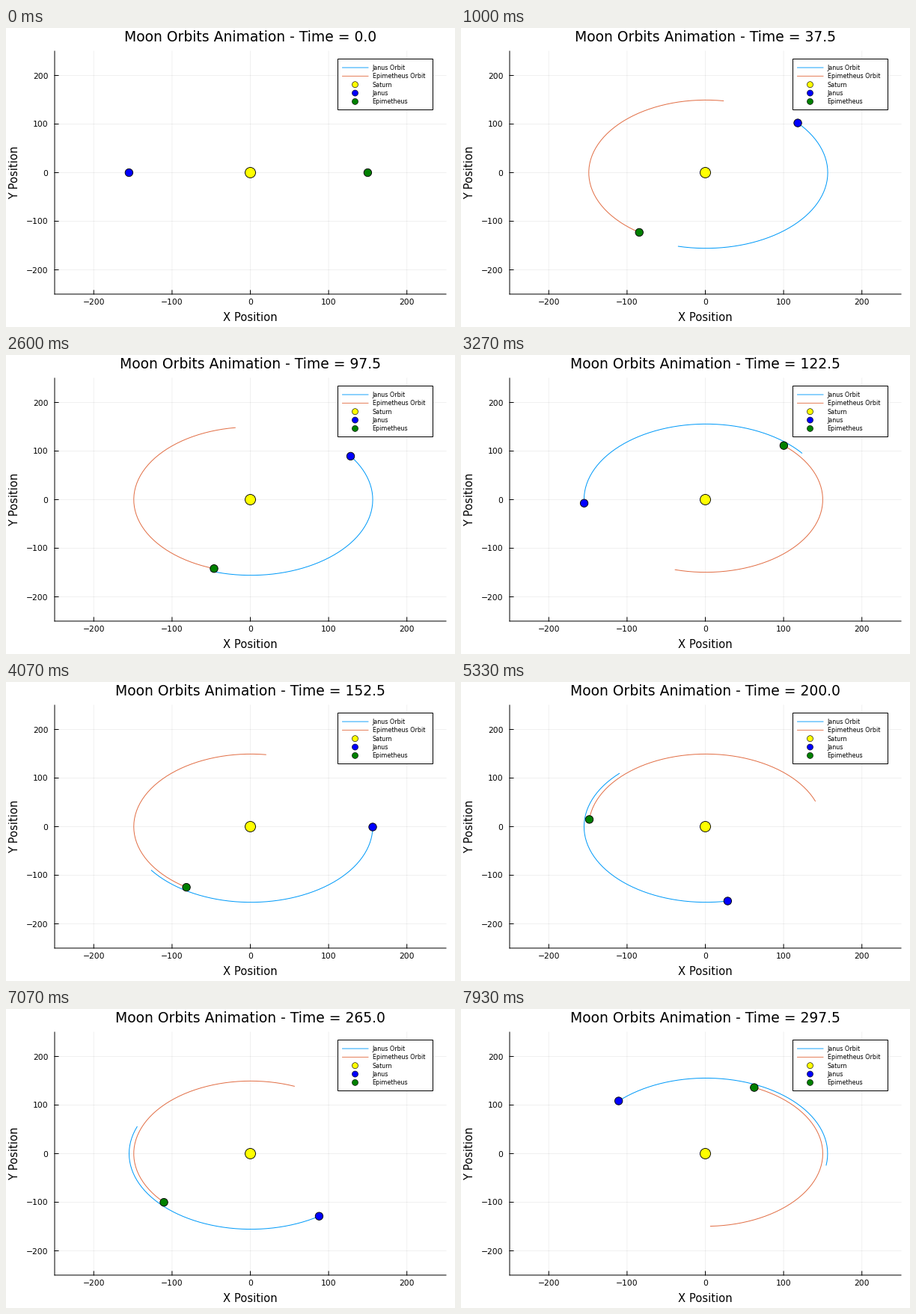
A matplotlib script that plays this animation: 600 by 400 pixels, repeating every 8000 ms.

```python
import numpy as np
import matplotlib.pyplot as plt
from matplotlib.animation import FuncAnimation
from matplotlib.patches import Circle, Rectangle

plt.rcParams["font.family"] = "DejaVu Sans"
plt.rcParams["path.snap"] = False

W, H, DPI = 600, 400, 100
POSES, HOLD, LOOP_MS = 120, 4, 8000  # each pose is held for HOLD frames
DT, SUB, TRAIL = 0.5, 5, 49          # time step, steps per pose, trail length
GM = 40000.0                         # planet
GM_JANUS, GM_EPI = 0.8, 4.5
LEFT, RIGHT, TOP, BOTTOM = 65, 588, 31, 356
CX, CY, SX, SY = 326.5, 193.5, 1.046, 0.65
BLUE, ORANGE = "#009af9", "#e26f46"


def accel(s):
    a, b = s[0:2], s[2:4]
    d = b - a
    pull = d / np.hypot(*d) ** 3
    acc_a = -GM * a / np.hypot(*a) ** 3 + GM_EPI * pull
    acc_b = -GM * b / np.hypot(*b) ** 3 - GM_JANUS * pull
    return np.concatenate([s[4:8], acc_a, acc_b])


def simulate(steps):
    s = np.array([-155, 0, 150, 0, 0, -16.1, 0, 16.3], float)
    out = [s]
    for _ in range(steps):
        k1 = accel(s)
        k2 = accel(s + DT / 2 * k1)
        k3 = accel(s + DT / 2 * k2)
        k4 = accel(s + DT * k3)
        s = s + DT / 6 * (k1 + 2 * k2 + 2 * k3 + k4)
        out.append(s)
    return np.array(out)


def px(x):
    return CX + SX * np.asarray(x)


def py(y):
    return CY - SY * np.asarray(y)


path = simulate(POSES * SUB)
janus = np.column_stack([px(path[:, 0]), py(path[:, 1])])
epi = np.column_stack([px(path[:, 2]), py(path[:, 3])])

fig = plt.figure(figsize=(W / DPI, H / DPI), dpi=DPI, facecolor="white")
ax = fig.add_axes([0, 0, 1, 1])
ax.set_xlim(0, W)
ax.set_ylim(H, 0)
ax.axis("off")


def pt(pixels):
    return pixels * 72 / DPI


def line(xs, ys, color="black", width=1.0, z=1, **kw):
    return ax.plot(xs, ys, color=color, lw=pt(width), zorder=z, **kw)[0]


def label(x, y, text, size, ha="center", **kw):
    return ax.text(x, y, text, fontsize=pt(size), ha=ha, va="baseline",
                   zorder=8, **kw)


def dot(x, y, r, color, z, edge=0.9):
    return ax.add_patch(Circle((x, y), r, fc=color, ec="black",
                               lw=pt(edge), zorder=z))


def minus(v):
    return str(v).replace("-", "\u2212")


for v in range(-200, 201, 100):
    x, y = float(px(v)), float(py(v))
    line([x, x], [TOP, BOTTOM], "black", 1, 0, alpha=0.06)
    line([LEFT, RIGHT], [y, y], "black", 1, 0, alpha=0.06)
    line([x, x], [BOTTOM, BOTTOM - 5])
    line([LEFT, LEFT + 5], [y, y])
    label(x, 370, minus(v), 10.8)
    label(56.5, y + 4, minus(v), 10.8, "right")

line([LEFT, LEFT], [TOP, BOTTOM])
line([LEFT, RIGHT], [BOTTOM, BOTTOM])
label(CX, 392, "X Position", 14.8)
label(16, CY - 0.5, "Y Position", 14.8, rotation=90, rotation_mode="anchor")
title = label(CX, 18, "", 18.75)

# legend
ax.add_patch(Rectangle((443.5, 41.5), 127, 68, fc="white", ec="black",
                       lw=pt(1), zorder=6))
entries = [("Janus Orbit", BLUE), ("Epimetheus Orbit", ORANGE),
           ("Saturn", "yellow"), ("Janus", "blue"), ("Epimetheus", "green")]
for i, (name, color) in enumerate(entries):
    y = 53 + 11.35 * i
    if i < 2:
        line([449.5, 484], [y, y], color, 0.9, 7)
    else:
        dot(466.5, y, 4, color, 7, 0.6)
    label(489.5, y + 3, name, 8, "left")

trail_j = line([], [], BLUE, 1, 2)
trail_e = line([], [], ORANGE, 1, 2)
dot(CX, CY, 7, "yellow", 3)
dot_j = dot(0, 0, 5.2, "blue", 4)
dot_e = dot(0, 0, 5.2, "green", 5)


def update(frame):
    # a pose appears slightly ahead of its nominal time
    i = min((frame + 1) // HOLD, POSES - 1) * SUB
    part = slice(max(0, i - TRAIL), i + 1)
    for pos, trail, moon in ((janus, trail_j, dot_j), (epi, trail_e, dot_e)):
        trail.set_data(pos[part, 0], pos[part, 1])
        moon.center = tuple(pos[i])
    title.set_text(f"Moon Orbits Animation - Time = {i * DT:.1f}")
    return trail_j, trail_e, dot_j, dot_e, title


FRAMES = POSES * HOLD
anim = FuncAnimation(fig, update, frames=FRAMES, interval=LOOP_MS / FRAMES,
                     init_func=lambda: update(0), repeat=True, repeat_delay=0)
plt.show()
```
